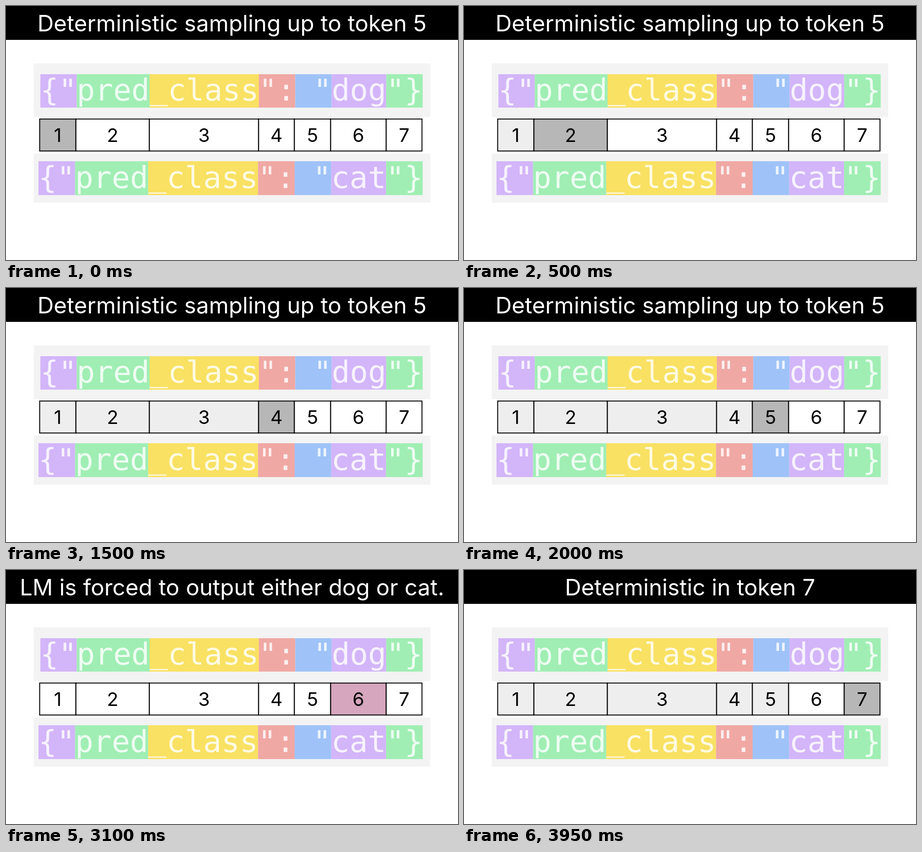
These frames come from a looping animation (960 px wide and 540 px high, 4.25 s). An HTML page:

```html
<!DOCTYPE html>
<html lang="en">
<head>
<meta charset="utf-8">
<title>Token sampling</title>
<style>
  html, body { margin: 0; width: 100%; height: 100%; overflow: hidden; background: #fff; }
  svg { display: block; width: 960px; height: 540px; }
  text { font-family: Inter, sans-serif; font-optical-sizing: none; text-anchor: middle; }
  #title { font-size: 48px; fill: #fff; }
  .cell { stroke: #000; stroke-width: 2; }
  .num { font-size: 40px; }
  .code {
    font-family: "DejaVu Sans Mono", monospace;
    text-anchor: start; white-space: pre;
    fill: #fff; fill-opacity: .82;
  }
</style>
</head>
<body>
<svg id="stage" viewBox="0 0 960 540"></svg>
<script>
const PURPLE = '#d3b5f9', GREEN = '#a0eeb4', YELLOW = '#f9e163', RED = '#f0a8a4', BLUE = '#9fc3f8';
const COLORS = [PURPLE, GREEN, YELLOW, RED, BLUE, PURPLE, GREEN];
const EDGES = [71.5, 148.5, 304.5, 536.5, 612.5, 689.5, 807.5, 883.5];
const NOW = '#b7b7b7', DONE = '#eeeeee', CHOICE = '#d5a6bd', EMPTY = '#ffffff';
const LOOP = 4250;

const rect = (x, y, w, h, fill, cls = '') =>
  `<rect class="${cls}" x="${x}" y="${y}" width="${w}" height="${h}" fill="${fill}"/>`;

// One line of coloured tokens on a grey panel
function codeRow(word, x, top, height, baseline, panelTop, panelHeight) {
  const tokens = ['{"', 'pred', '_class', '":', ' "', word, '"}'];
  const step = (885 - x) / tokens.join('').length;
  let boxes = rect(59, panelTop, 842, panelHeight, '#f3f3f3'), texts = '';
  tokens.forEach((token, i) => {
    const width = step * token.length;
    const label = token.replace(/_(.*)/, '<tspan dy="-3">_</tspan><tspan dy="3">$1</tspan>');
    boxes += rect(x, top, width, height, COLORS[i]);
    texts += `<text class="code" x="${x}" y="${baseline}" font-size="${step / 0.602}">${label}</text>`;
    x += width;
  });
  return boxes + texts;
}

function cells() {
  let out = '';
  for (let i = 0; i < 7; i++) {
    const x = EDGES[i], w = EDGES[i + 1] - x;
    out += rect(x, 240.3, w, 68, EMPTY, 'cell')
      + `<text class="num" x="${x + w / 2}" y="289">${i + 1}</text>`;
  }
  return out;
}

const stage = document.getElementById('stage');
stage.innerHTML = rect(0, 0, 960, 72, '#000')
  + '<text id="title" x="480" y="54"></text>'
  + codeRow('dog', 73, 145, 71, 201, 122, 114)
  + codeRow('cat', 69, 330, 72, 386.5, 314, 104)
  + cells();
const title = document.getElementById('title');
const boxes = stage.querySelectorAll('.cell');

function draw(t) {
  const step = t < 2500 ? Math.floor(t / 500) : t < 3500 ? 5 : 6;
  title.textContent = step < 5 ? 'Deterministic sampling up to token 5'
    : step === 5 ? 'LM is forced to output either dog or cat.'
    : 'Deterministic in token 7';
  boxes.forEach((box, i) => {
    const fill = i === step ? (step === 5 ? CHOICE : NOW)
      : i < step && i !== 5 && step !== 5 ? DONE : EMPTY;
    box.setAttribute('fill', fill);
  });
}

const start = performance.now();
function tick() {
  draw((performance.now() - start) % LOOP);
  requestAnimationFrame(tick);
}
tick();
</script>
</body>
</html>
```
